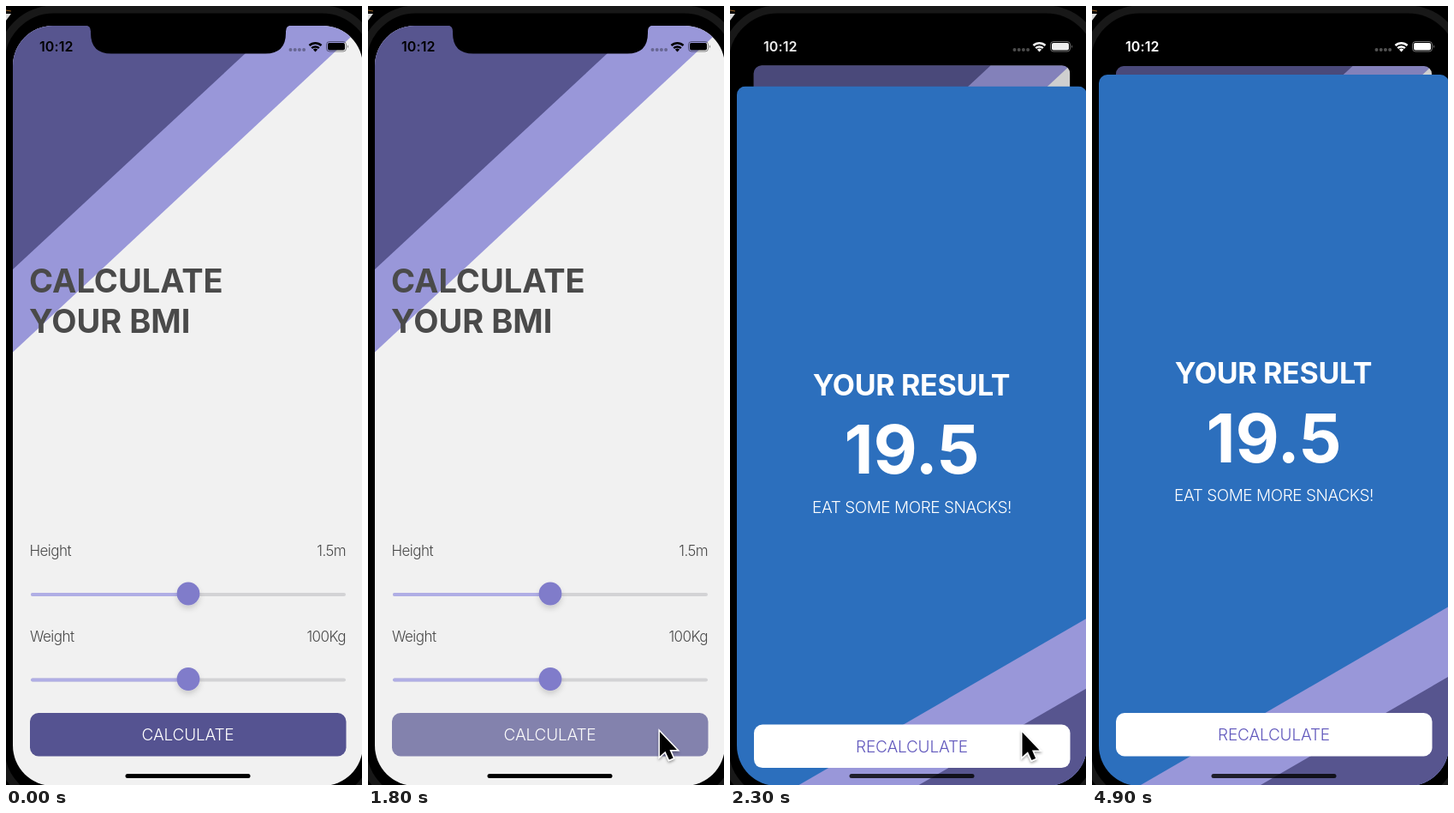
Recreate the animation shown at these times as an HTML page. Size 416 by 908 pixels, loop 5.2 s.

```html
<!DOCTYPE html>
<html lang="en">
<head>
<meta charset="utf-8">
<title>BMI calculator</title>
<style>
  html, body { margin: 0; width: 100%; height: 100%; overflow: hidden; background: #000; }
  svg { display: block; width: 416px; height: 908px; font-family: Inter, sans-serif; }
  .title { font-size: 38px; font-weight: 700; fill: #4a4a4a; }
  .label { font-size: 17px; font-weight: 350; letter-spacing: -.55px; fill: #4a4a4a; }
  .button { font-size: 19px; font-weight: 350; letter-spacing: -.2px; }
  .advice { font-size: 19px; font-weight: 300; letter-spacing: -.45px; }
  .end { text-anchor: end; }
  .mid { text-anchor: middle; }
</style>
</head>
<body>
<svg viewBox="0 0 416 908">
  <defs>
    <clipPath id="screen"><rect x="8" y="23" width="409" height="886" rx="47"/></clipPath>
    <clipPath id="cardClip"><rect id="cardShape" x="8" y="23" width="409" height="886"/></clipPath>
    <clipPath id="sheetClip"><rect x="8" y="80" width="409" height="900" rx="10"/></clipPath>
    <filter id="shadow" x="-50%" y="-50%" width="200%" height="220%">
      <feDropShadow dx="0" dy="4" stdDeviation="3" flood-opacity=".15"/>
    </filter>
    <filter id="cursorShadow" x="-50%" y="-50%" width="200%" height="200%">
      <feDropShadow dx="0" dy="2" stdDeviation="1.5" flood-opacity=".35"/>
    </filter>
    <g id="slider">
      <rect x="29" y="-2" width="368" height="4" rx="2" fill="#d3d3d5"/>
      <rect x="29" y="-2" width="184" height="4" rx="2" fill="#b0aee5"/>
      <circle cx="213" cy="-1" r="13.4" fill="#807cca" filter="url(#shadow)"/>
    </g>
  </defs>

  <!-- phone body -->
  <rect width="416" height="908"/>
  <rect x="-6" y="4" width="437" height="924" rx="62" fill="none" stroke="#181818" stroke-width="9"/>
  <path d="M0 9h6l-6 8z" fill="#d8d8d8"/>
  <path d="M0 5l6 1" stroke="#9a6428"/>

  <g clip-path="url(#screen)">
    <g id="card" clip-path="url(#cardClip)">
      <rect x="8" y="23" width="409" height="886" fill="#f1f1f1"/>
      <path d="M8 23H417L8 403.500z" fill="#9997d9"/>
      <path d="M8 23H314.500L8 307z" fill="#57558f"/>
      <text class="title" x="27" y="334">CALCULATE</text>
      <text class="title" x="27" y="381">YOUR BMI</text>
      <text class="label" x="27.500" y="641">Height</text>
      <text class="label end" x="397" y="641">1.5m</text>
      <use href="#slider" y="686"/>
      <text class="label" x="28" y="741">Weight</text>
      <text class="label end" x="397" y="741">100Kg</text>
      <use href="#slider" y="785.5"/>
      <g id="calculate">
        <rect x="28" y="824" width="369.5" height="50.5" rx="10" fill="#555391"/>
        <text class="button mid" x="212.5" y="856" fill="#fff">CALCULATE</text>
      </g>
    </g>

    <g id="sheet">
      <g clip-path="url(#sheetClip)">
        <rect x="8" y="80" width="409" height="900" fill="#2c6fbd"/>
        <path d="M57 908L417 700V908z" fill="#9997d9"/>
        <path d="M197 908L417 781.5V908z" fill="#57558f"/>
        <g class="mid" fill="#fff">
          <text x="212" y="440" font-size="34" font-weight="700" letter-spacing="-.3">YOUR RESULT</text>
          <text x="212.5" y="531.5" font-size="79" font-weight="700">19.5</text>
          <text class="advice" x="212.5" y="577">EAT SOME MORE SNACKS!</text>
        </g>
        <rect x="28" y="824" width="369.5" height="50.5" rx="10" fill="#fff"/>
        <text class="button mid" x="212.5" y="856" fill="#6259bd">RECALCULATE</text>
      </g>
    </g>
    <rect id="home" x="139.5" y="895" width="146" height="5" rx="2.5"/>
  </g>

  <path d="M92 22.5q7 0 7 7v2q0 24 24 24h180q24 0 24-24v-2q0-7 7-7z"/>

  <g id="status">
    <text x="39" y="53" font-size="16" font-weight="600" letter-spacing=".1">10:12</text>
    <path d="M332.5 51h16" stroke="currentColor" stroke-width="4" stroke-linecap="round" stroke-dasharray="0 5.2" opacity=".32"/>
    <g fill="none" stroke="currentColor" stroke-width="2.5">
      <path d="M354.5 46a10 10 0 0 1 14 0"/>
      <path d="M357.2 49.2a6.2 6.2 0 0 1 8.6 0"/>
    </g>
    <path d="M361.5 53.5l-2.6-2.7a3.8 3.8 0 0 1 5.2 0z"/>
    <rect x="374.5" y="41.5" width="23" height="11.5" rx="3.5" fill="none" stroke="currentColor" opacity=".45"/>
    <rect x="376" y="43" width="20" height="8.5" rx="2"/>
    <path d="M399 45.5q2 1.7 0 3.6z" opacity=".5"/>
  </g>

  <g id="cursor" filter="url(#cursorShadow)">
    <path d="M1.5 3.5V32L8 26.3L12.5 36L17.200 34L13 24.500H21.500z" stroke="#fff" stroke-width="3" paint-order="stroke"/>
  </g>
</svg>
<script>
const LOOP = 5200, STEP = 100;
const OPEN_AT = 1965, OMEGA = .0181, TRAVEL = 828;
const cursorPath = [ // time, x, y
  [100, 407, 697], [300, 394, 790], [600, 379, 842], [1000, 361, 838],
  [1200, 344, 842], [1400, 339, 842], [2300, 340, 843], [2800, 410, 880]
];
const pressPath = [[1700, 1], [1800, .7], [1900, .4], [2000, 1]];
const el = id => document.getElementById(id);
const clamp = v => Math.min(1, Math.max(0, v));

// Linear interpolation over [time, ...values] keys; null outside their range.
function track(keys, t) {
  const i = keys.findIndex(k => k[0] >= t);
  if (i < 0 || t < keys[0][0]) return null;
  if (i === 0) return keys[0].slice(1);
  const a = keys[i - 1], b = keys[i], u = (t - a[0]) / (b[0] - a[0]);
  return a.slice(1).map((v, n) => v + (b[n + 1] - v) * u);
}

function draw(t) {
  // Critically damped spring: the share of the opening still to go.
  const x = Math.max(0, t - OPEN_AT) * OMEGA;
  const left = (1 + x) * Math.exp(-x), done = 1 - left;

  const scale = 1 - .0975 * done;
  el('card').setAttribute('transform',
    `translate(212.5 ${23 + 47 * done}) scale(${scale}) translate(-212.5 -23)`);
  el('card').setAttribute('opacity', 1 - .142 * done);
  el('cardShape').setAttribute('rx', 40 - 30 * done);
  el('sheet').setAttribute('transform', `translate(0 ${TRAVEL * left + (done ? 0 : 20)})`);
  el('home').setAttribute('opacity', done ? .8 : 1);

  const [press] = track(pressPath, t) || [1];
  el('calculate').setAttribute('opacity', press);

  const white = Math.round(255 * clamp((t - 2018) / 303));
  el('status').style.color = el('status').style.fill = `rgb(${white},${white},${white})`;

  const tip = track(cursorPath, t);
  el('cursor').style.display = tip ? '' : 'none';
  if (tip) el('cursor').setAttribute('transform', `translate(${tip})`);
}

const start = performance.now();
function tick() {
  const t = (performance.now() - start) % LOOP;
  draw(Math.floor(t / STEP) * STEP);
  requestAnimationFrame(tick);
}
tick();
</script>
</body>
</html>
```
